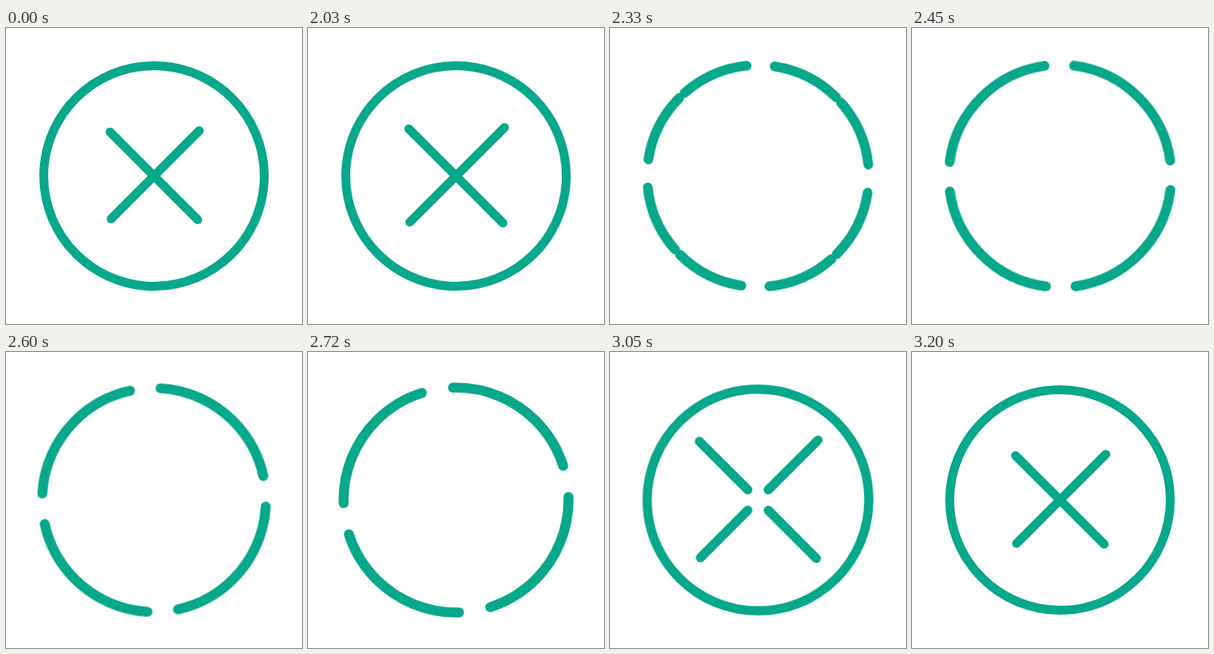
These frames come from a looping animation (400 by 400 pixels, 3230 ms). An HTML page without scripts:

```html
<!DOCTYPE html>
<html lang="en">
<head>
<meta charset="utf-8">
<title>Close icon</title>
<style>
  html, body { margin: 0; width: 100%; height: 100%; overflow: hidden; background: #fff; }
  svg { display: block; width: 100%; height: 100%; }

  .icon, .ring, .leave, .enter { animation: 3230ms linear infinite; }
  .icon {
    fill: none; stroke: #08a88a; stroke-linecap: round;
    transform-origin: 200px 200px;
    animation-name: swell;
  }
  .ring { animation-name: ring; }
  .leave { animation-name: leave; }
  .enter { animation-name: enter; }
  use { stroke-dasharray: var(--len) 600px; }

  @keyframes swell {
    0%, 63.78% { transform: scale(1); stroke-width: 12px; }
    68.42% { transform: scale(1.002); stroke-width: 12.9px; }
    75.85% { transform: scale(1.009); stroke-width: 13.2px; }
    84.21% { transform: scale(1.02); stroke-width: 13.2px; }
    90.71% { transform: scale(1.016); stroke-width: 13.2px; }
    96.28%, 100% { transform: scale(1); stroke-width: 12px; }
  }

  /* Degrees per quarter: arc, split at the hook, rest of arc, open gap */
  @keyframes ring {
    0%, 63.78% { stroke-dasharray: 40px 0px 50px 0px; stroke-dashoffset: -5px; }
    68.42% { stroke-dasharray: 34.5px 7.5px 34.2px 13.8px; stroke-dashoffset: -10px; }
    75.85% { stroke-dasharray: 37.7px 0px 37px 15.3px; stroke-dashoffset: -7.3px; }
    79.57% { stroke-dasharray: 40.4px 0px 34px 15.6px; stroke-dashoffset: -4.6px; }
    84.21% { stroke-dasharray: 46.5px 0px 27.3px 16.2px; stroke-dashoffset: 1.5px; }
    87.93% { stroke-dasharray: 57px 0px 21px 12px; stroke-dashoffset: 11px; }
    90.71% { stroke-dasharray: 58.2px 15.7px 10.1px 6px; stroke-dashoffset: 24.2px; }
    92.57%, 100% { stroke-dasharray: 78px 0px 12px 0px; stroke-dashoffset: 33px; }
  }

  /* Arms slide outward and bend onto the ring */
  @keyframes leave {
    0%, 62.84% { stroke-dashoffset: 8px; }
    62.85% { stroke-dashoffset: 2px; }
    63.78% { stroke-dashoffset: -5px; }
    64.71% { stroke-dashoffset: -18px; }
    66.56% { stroke-dashoffset: -50px; }
    68.42% { stroke-dashoffset: -86px; }
    70.28% { stroke-dashoffset: -122px; }
    72.14% { stroke-dashoffset: -160px; opacity: 1; }
    72.15%, 100% { stroke-dashoffset: -160px; opacity: 0; }
  }

  /* Arms peel off the ring and slide back to the centre */
  @keyframes enter {
    0%, 87.93% { stroke-dashoffset: -165px; opacity: 0; }
    87.94% { stroke-dashoffset: -165px; opacity: 1; }
    90.71% { stroke-dashoffset: -138px; }
    91.64% { stroke-dashoffset: -112px; }
    92.57% { stroke-dashoffset: -78px; }
    93.5% { stroke-dashoffset: -45px; }
    94.43% { stroke-dashoffset: -20px; }
    95.36% { stroke-dashoffset: -4px; }
    96.28% { stroke-dashoffset: 3px; }
    97.21% { stroke-dashoffset: 5.5px; }
    99.07% { stroke-dashoffset: 7px; }
    100% { stroke-dashoffset: 8px; opacity: 1; }
  }

  .nw { --len: 92px; }
  .ne { --len: 94.5px; }
  .se { --len: 91.5px; }
  .sw { --len: 90px; }
</style>
</head>
<body>
<svg viewBox="0 0 400 400">
  <defs>
    <path id="out" d="M200 200L112 112C102 102 100 92 107.5 83.5A149 149 0 0 1 164 55.4"/>
    <path id="in" d="M200 200L116 116C108 104 86 103 76.5 116.7A149 149 0 0 0 53.3 174.1"/>
  </defs>
  <g class="icon">
    <circle class="ring" cx="200" cy="200" r="149" pathLength="360"/>
    <g class="leave">
      <use class="nw" href="#out"/>
      <use class="ne" href="#out" transform="rotate(90 200 200)"/>
      <use class="se" href="#out" transform="rotate(180 200 200)"/>
      <use class="sw" href="#out" transform="rotate(270 200 200)"/>
    </g>
    <g class="enter">
      <use class="nw" href="#in"/>
      <use class="ne" href="#in" transform="rotate(90 200 200)"/>
      <use class="se" href="#in" transform="rotate(180 200 200)"/>
      <use class="sw" href="#in" transform="rotate(270 200 200)"/>
    </g>
  </g>
</svg>
</body>
</html>
```
